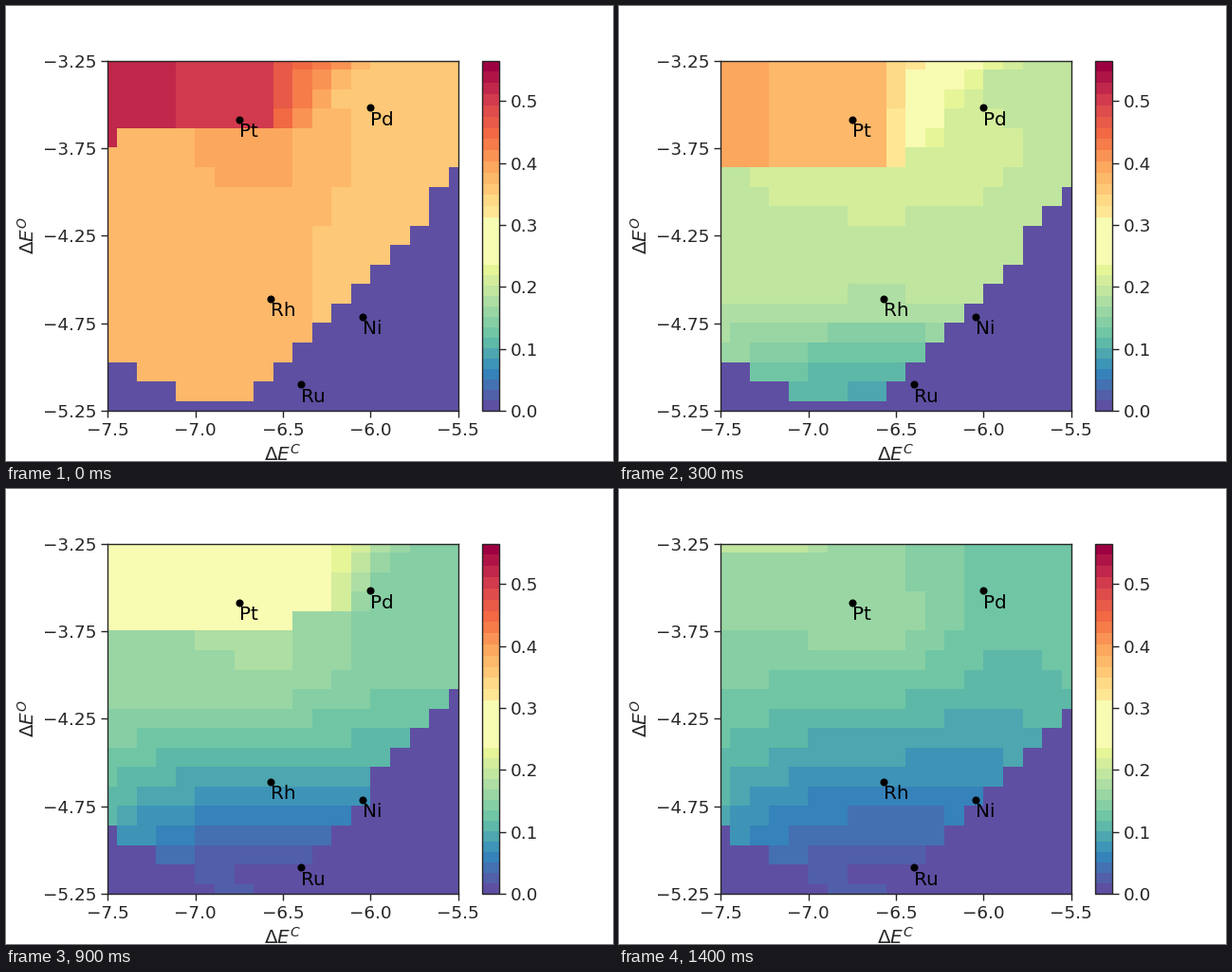
Animation of 640 by 480 pixels, one loop 1.5 s. Source, as a matplotlib script:

```python
import numpy as np
import matplotlib as mpl
import matplotlib.pyplot as plt
from matplotlib.animation import FuncAnimation
from matplotlib.colors import BoundaryNorm, ListedColormap

INK = "0.15"
mpl.rcParams.update({
    "font.family": "DejaVu Sans", "font.size": 14.4, "axes.labelsize": 14.4,
    "xtick.labelsize": 13.2, "ytick.labelsize": 13.2,
    "axes.linewidth": 1, "axes.edgecolor": INK, "axes.labelcolor": INK,
    "xtick.color": INK, "ytick.color": INK,
    "xtick.major.size": 4.8, "ytick.major.size": 4.8,
    "xtick.major.width": 1, "ytick.major.width": 1,
})

N = 19          # grid points per side
STEP_MS = 100
FRAMES = 15
ROW, COL = np.mgrid[:N, :N]

# Colour scale: cool bands, one wide yellow band, warm bands
EDGES = np.r_[np.linspace(0, 0.236, 15), np.linspace(0.312, 0.565, 15)]
spectral = plt.get_cmap("Spectral_r")
CMAP = ListedColormap(np.vstack([
    spectral(np.linspace(0, 0.4, 14)),
    mpl.colors.to_rgba("#f8fbb2"),
    spectral(np.linspace(0.581, 1, 14)),
]))
NORM = BoundaryNorm(EDGES, CMAP.N)

# How each feature of the surface develops over the loop
KEY_MS = [0, 100, 300, 500, 900, 1200, 1400]
KEYS = {
    "base": [0.372, 0.28, 0.198, 0.17, 0.155, 0.157, 0.154],
    "hump": [0.018, 0.018, 0.018, 0.018, 0.018, 0.006, 0.006],
    "fall": [0.02, 0, 0, 0.015, 0.02, 0.03, 0.03],
    "pit_depth": [0, 0, 0.5, 0.75, 0.9, 0.9, 0.9],
    "pit_top": [12, 12, 11, 9.5, 7.5, 5.5, 4],
    "plateau": [0.52, 0.47, 0.392, 0.34, 0.285, 0.235, 0.2],
    "plateau_rows": [4.1, 5.2, 6, 6.1, 5, 2.4, 0.6],
    "knee": [8, 8, 8, 9, 11, 11, 11],
}


def params(t):
    return {name: np.interp(t, KEY_MS, vals) for name, vals in KEYS.items()}


def lowland(p):
    """Gentle hump, falling to the right and into a pit at the bottom."""
    hump = np.exp(-((COL - 8) / 6) ** 2 - ((ROW - 4.5) / 3) ** 2)
    right = np.clip((COL - 9) / 5, 0, 1)
    depth = np.clip((ROW - p["pit_top"]) / (16.5 - p["pit_top"]), 0, 1) ** 1.2
    pit = p["pit_depth"] * depth * (1 - ((COL - 8) / 12) ** 2)
    return (p["base"] + p["hump"] * hump - p["fall"] * right) * (1 - pit)


def plateau(p):
    """Hot shelf at the top left that slopes away past the knee."""
    past = np.maximum(COL - p["knee"], 0)
    shelf = p["plateau"] - 0.003 * COL - 0.033 * (0.6 + 0.2 * ROW) * past
    return np.where(ROW < p["plateau_rows"] - 0.1 * COL, shelf, 0)


def active_cells(t):
    """Cells left of the dead zone; each front pushes its edge one cell out."""
    fronts = [
        np.interp(t, [0, 100, 300], [8, 7, 6]),
        np.interp(t, [0, 100, 300, 500], [18, 13, 10, 7]),
        np.interp(t, [500, 900, 1200], [18, 13, 8]),
    ]
    edge = 24 - ROW + sum(ROW >= front for front in fronts)
    start = np.where(ROW >= 15, 2 * (ROW - 15) + (t >= 500), 0)
    return (COL >= start) & (COL < edge) & (ROW < N - 1)


def field_at(t):
    p = params(t)
    field = np.maximum(lowland(p), plateau(p))
    field = np.where(active_cells(t), field, 0)
    if t >= 500:
        field[-1, 6:7 + t // 500] = 0.02
    return field


fig, ax = plt.subplots(figsize=(6.4, 4.8), dpi=100)
half = 1 / (N - 1)
image = ax.imshow(field_at(0), cmap=CMAP, norm=NORM, interpolation="nearest",
                  extent=(-7.5 - half, -5.5 + half, -5.25 - half, -3.25 + half))
ax.set(xlim=(-7.5, -5.5), ylim=(-5.25, -3.25),
       xticks=np.arange(-7.5, -5.4, 0.5), yticks=np.arange(-5.25, -3.2, 0.5),
       xlabel=r"$\Delta E^{C}$", ylabel=r"$\Delta E^{O}$")
ax.xaxis.set_major_formatter("{x:.1f}")
ax.yaxis.set_major_formatter("{x:.2f}")

bar = fig.colorbar(image, ax=ax, spacing="proportional",
                   ticks=np.arange(0, 0.51, 0.1), format="%.1f")
bar.minorticks_off()

METALS = {"Pt": (-6.75, -3.59), "Pd": (-6.0, -3.52), "Rh": (-6.57, -4.61),
          "Ni": (-6.045, -4.715), "Ru": (-6.397, -5.1)}
for name, xy in METALS.items():
    ax.plot(*xy, "o", color="black", markersize=4.8)
    ax.annotate(name, xy, xytext=(0, -13), textcoords="offset points",
                color="black", va="baseline")


def draw(i):
    image.set_data(field_at(i * STEP_MS))
    return [image]


anim = FuncAnimation(fig, draw, frames=FRAMES, interval=STEP_MS, repeat=True)
plt.show()
```
